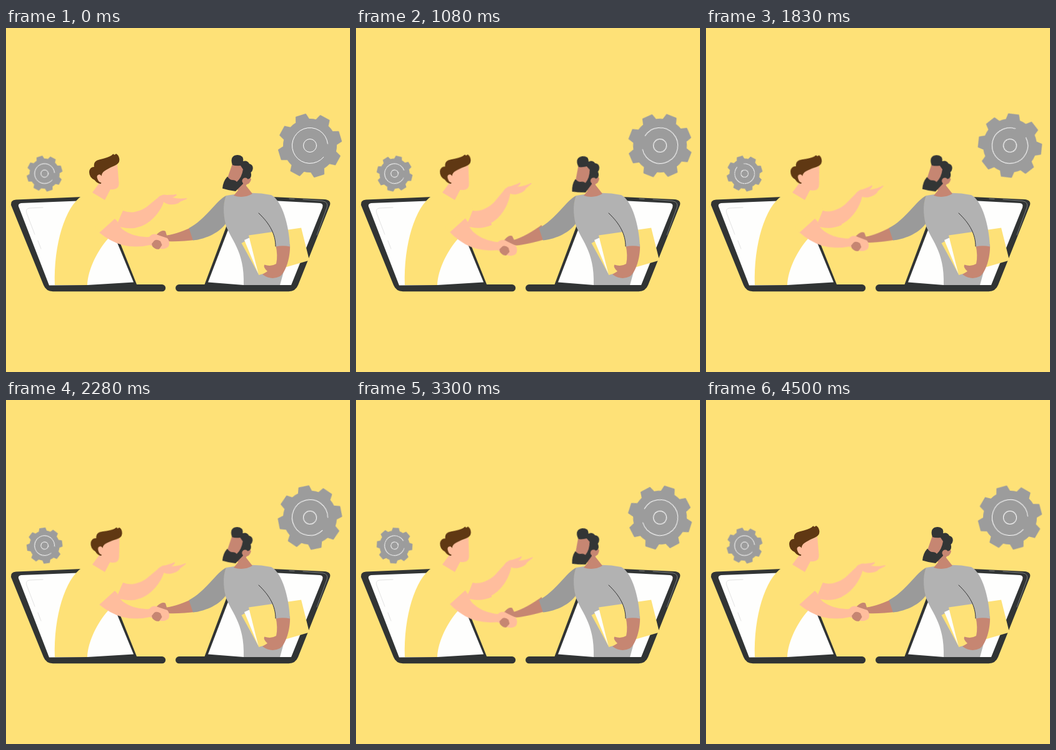
Write an HTML page that moves like this. It is 550 by 550 pixels and loops after 4530 ms.

```html
<!DOCTYPE html>
<html lang="en">
<head>
<meta charset="utf-8">
<title>Online handshake</title>
<style>
  html, body { margin: 0; width: 100%; height: 100%; overflow: hidden; background: #fee177; }
  svg { display: block; width: 100%; height: 100%; }

  .yellow { fill: #fee177; }
  .white { fill: #fefefd; }
  .dark { fill: #313434; }
  .fair { fill: #ffbd9d; }
  .tan { fill: #c68672; }
  .gray { fill: #b2b2b2; }
  .sleeve { fill: #9a9a9a; }
  .brown { fill: #603813; }
  .hair { fill: #333535; }
  .line { fill: none; stroke-width: 1; stroke-linecap: round; }

  .move { animation: 4.53s linear infinite; }
  .spin { animation-name: spin; }
  .spin-fast { animation-name: spin-fast; }
  .head-l { animation-name: head-l; transform-origin: 152px 253px; animation-timing-function: cubic-bezier(.27, .1, .73, .9); }
  .head-r { animation-name: head-r; transform-origin: 380px 262px; animation-timing-function: cubic-bezier(.27, .2, .73, .8); }
  .shake-l { animation-name: shake-l; transform-origin: 165px 322px; }
  .shake-r { animation-name: shake-r; transform-origin: 297px 330px; }
  .arm { animation-name: arm; transform-origin: 183px 302px; }
  .palm { animation-name: palm; transform-origin: 249px 273px; }
  .shake-l, .shake-r, .arm, .palm { animation-timing-function: cubic-bezier(.37, 0, .63, 1); }

  @keyframes spin { to { transform: rotate(726.5deg); } }
  @keyframes spin-fast { to { transform: rotate(1449.6deg); } }
  @keyframes head-l {
    0%, 99.34%, 100% { transform: rotate(0deg); }
    49.67% { transform: rotate(6deg); }
  }
  @keyframes head-r {
    0%, 45.3%, 49.67%, 95%, 100% { transform: rotate(0deg); }
    10.6%, 60.3% { transform: rotate(-13.5deg); }
  }
  @keyframes shake-l {
    0%, 49.67%, 99.34%, 100% { transform: rotate(0deg); }
    24.83%, 74.5% { transform: rotate(7.5deg); }
  }
  @keyframes shake-r {
    0%, 49.67%, 99.34%, 100% { transform: translate(0, 0) rotate(0deg); }
    24.83%, 74.5% { transform: translate(-5px, 1px) rotate(-9deg); }
  }
  @keyframes arm {
    0%, 54.8% { transform: rotate(0deg); }
    27.4% { transform: rotate(-11.5deg); }
    82.1% { transform: rotate(-11.5deg); animation-timing-function: cubic-bezier(.5, 0, .9, .7); }
    100% { transform: rotate(-3.5deg); }
  }
  @keyframes palm {
    0%, 99.34%, 100% { transform: rotate(0deg); }
    49.67% { transform: rotate(-14deg); }
  }
</style>
</head>
<body>
<svg viewBox="0 0 550 550">
  <defs>
    <g id="gear">
      <path id="cog" fill="#9c9c9c" stroke="#9c9c9c" stroke-width="2" stroke-linejoin="round"/>
      <circle class="line" r="10.5" stroke="#fff" vector-effect="non-scaling-stroke"/>
      <path id="arc" class="line" stroke="#fff" vector-effect="non-scaling-stroke"/>
    </g>
  </defs>

  <g transform="translate(486 188)"><use href="#gear" class="move spin"/></g>
  <g transform="translate(61.7 232.8) scale(.56)"><use href="#gear" class="move spin-fast"/></g>

  <!-- left laptop -->
  <path class="dark" d="M8 283Q7 275 16 274.500L122 270L153 270L209 410H249.500a5.500 5.500 0 0 1 0 11.300H75Q64 421 60 411Z"/>
  <path class="white" d="M20 285Q19 281 24 280L115 276.500L150 276L204 406.500L130 411L69 411.500Z"/>
  <path class="line" stroke="#e2e2e2" d="M59 287L37 288Q31 289 33 296L46 330M51 340L56 353"/>

  <!-- left torso -->
  <path class="yellow" d="M121 268.500C95 286 76 345 78 411H130C131 385 147 355 163 337L178 332L190 293L166 260H138Z"/>

  <!-- left head -->
  <path class="fair" d="M138 263L153 243L168 256L158 275Z"/>
  <g class="move head-l">
    <path class="fair" d="M148 236L158 225Q172 222 178 218L180.500 248Q181 257 172 258Q163 259 157 252L147 245Z"/>
    <path class="brown" d="M133 230Q134 222 141 222Q139 213 149 210.500Q164 207 169 203.500Q172 200 173 203Q175 202 176 201Q180 203 181 208Q183 216 174 220Q166 223 160 227Q154 230 153 235L152 249Q146 249 141.500 243Q133 239 133 230Z"/>
    <path class="fair" d="M155 246Q150 249 147 243Q144 237 147 235Q151 232 155 240Z"/>
  </g>

  <!-- open arm -->
  <path class="fair" d="M187 292Q200 297 212 294L217 315Q196 324 176 316Z"/>
  <g class="move arm">
    <path class="fair" d="M187 293C205 298 220 291 231 281L247 268L252 279C246 295 232 311 216 317Q195 325 178 314Z"/>
    <path class="fair move palm" d="M243 271Q250 265 257 267L269 266.500Q272 265 273 267Q270 270 266 271Q277 274 289 272Q291 273 285 275L278 278Q276 281 268 282Q257 283 252 278L246 283Z"/>
  </g>
  <path class="yellow" d="M187 290L176 318L172 308L172 288Z"/>

  <!-- right laptop -->
  <path class="dark" d="M370 270L425 270L509 274Q520 275 518 283L467 411Q463 421 452 421.300H276.700a5.500 5.500 0 0 1 0 -11.300H317.500Z"/>
  <path class="white" d="M373 276L425 276L502 280Q508 281 506 287L456 411H380L323 406.500Z"/>
  <path class="yellow" d="M351 265H426L424 270L370 270L350 320L335 320Z"/>
  <path class="line" stroke="#777b7a" d="M453 273L461 273.500M475 274L506 276.500Q516 278 513 287L497 331"/>

  <!-- right torso -->
  <path class="gray" d="M352 268C346 280 347 298 350 311C358 338 382 355 380 411H438L448 375L440 290L424 267Q395 261 365 266Z"/>

  <!-- folder -->
  <path class="yellow" d="M376.500 344L384 340L404 394Z"/>
  <path class="white" d="M381 339L390 335L407 394L403 392Z"/>
  <path class="yellow" d="M388 331.500L472 319.500L485 371.500L404 395Z"/>

  <!-- arm with folder -->
  <path class="tan" d="M431 346L454 346C455 367 447 391 438 397Q424 404 410 394L418 389Q411 383 413 378.500Q424 382 432 377Q435 364 431 346Z"/>
  <path class="gray" d="M404 268L424 267C442 276 453 318 454 349.500Q443 347 431 349.500C431 329 420 312 404 296Z"/>
  <path class="line" stroke="#333" d="M404 296C422 313 431 330 431 349"/>

  <!-- right head -->
  <path class="tan" d="M379 246L394 265Q380 273 364 268L374 256Z"/>
  <g class="move head-r">
    <path class="tan" d="M362 217L380 221L392 242Q390 249 385 250L377 262L364 255L354 240Z"/>
    <path class="hair" d="M362 219Q358 208 365 204Q373 201 378 206Q380 209 379 213Q386 211 389 217Q396 219 394.500 226Q394 229 391.500 231Q394 240 386 242L383 240Q379 242 379 249L367 261Q357 260 346 256.500Q347 245 354 237.500Q358 243 362 243Q367 243 369 246Q377 239 379 226L375 220Q367 221 362 219Z"/>
    <circle class="tan" cx="382.500" cy="244.500" r="5"/>
  </g>

  <!-- handshake -->
  <path class="tan move shake-r" d="M304 315L309 338Q276 342 260 341L244 337Q238 332 242 329Q250 322 255 325L257 331.500Q276 329 304 315Z"/>
  <path class="sleeve" d="M352 268C338 274 318 307 292.500 320L299 339.500C322 337 342 326 351 313C347 296 347 280 352 268Z"/>
  <g class="move shake-l">
    <path class="fair" d="M172 303L178 309Q181 323 204 331Q217 335 229 334Q235 327 243 331L258 336Q263 342 260 349Q256 354 247 353L230 347Q207 352 186 347Q166 341 149 327Z"/>
    <path class="tan" d="M233 345L237 340Q241 337 247 341L249.500 347L245 353.500Q239 355 234 349Z"/>
  </g>
  <path class="yellow" d="M174.500 304.500L149.500 327L142 318L166 297Z"/>
</svg>
<script>
  const TEETH = 8, ROOT = 42, TIP = 50.5, START = 28;
  const at = (r, deg) => {
    const a = deg * Math.PI / 180;
    return (r * Math.cos(a)).toFixed(2) + " " + (r * Math.sin(a)).toFixed(2);
  };

  let cog = "";
  for (let i = 0; i < TEETH; i++) {
    const mid = START + i * 360 / TEETH;
    cog += (i ? `A${ROOT} ${ROOT} 0 0 1 ` : "M") + at(ROOT, mid - 14.5) +
      "L" + at(TIP, mid - 9) + "L" + at(TIP, mid + 9) + "L" + at(ROOT, mid + 14.5);
  }
  cog += `A${ROOT} ${ROOT} 0 0 1 ${at(ROOT, START - 14.5)}Z`;
  document.getElementById("cog").setAttribute("d", cog);
  document.getElementById("arc").setAttribute("d", `M${at(28.5, 40)}A28.5 28.5 0 1 1 ${at(28.5, -6)}`);
</script>
</body>
</html>
```
